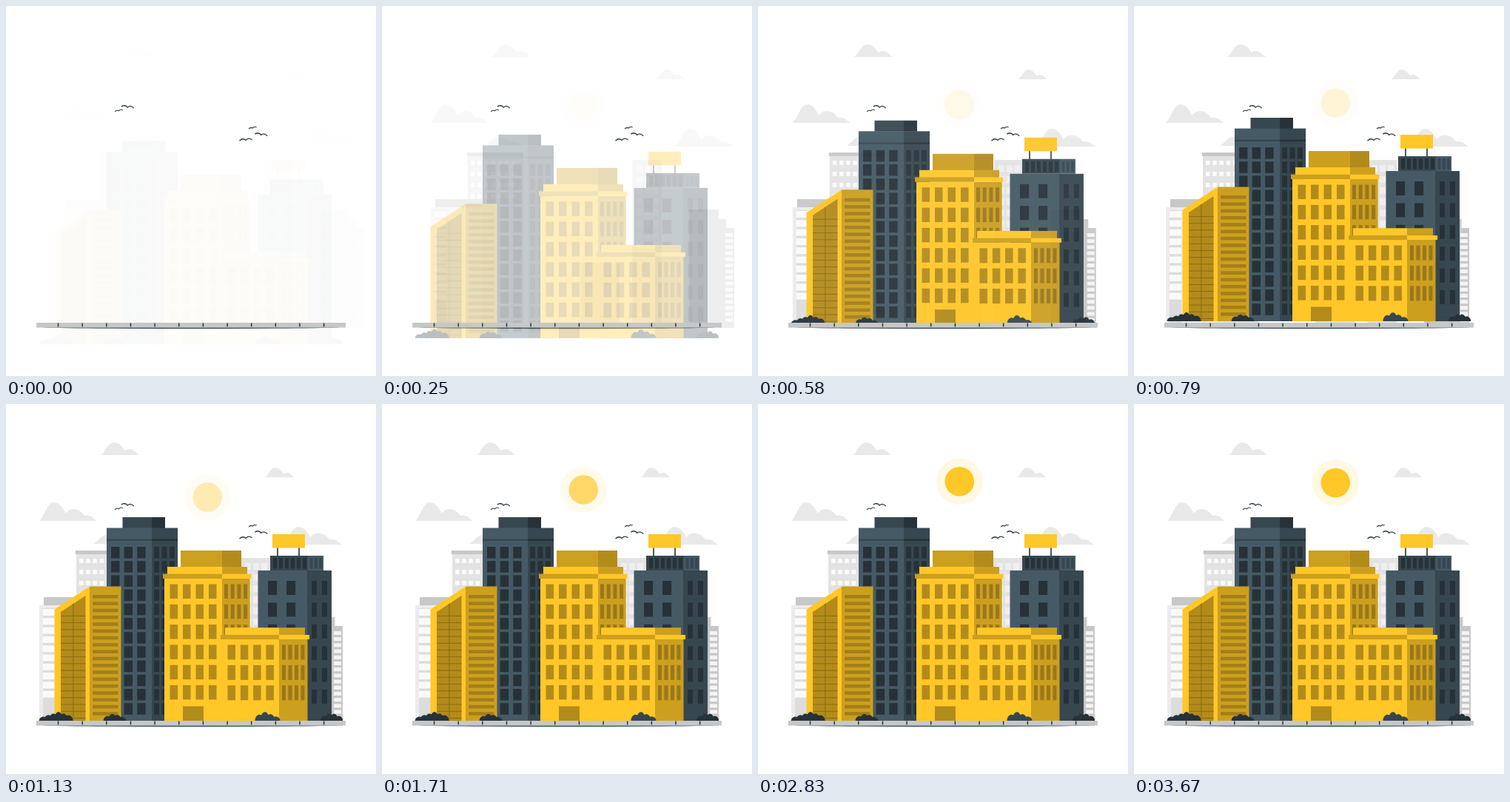
Animation of 500 by 500 pixels, one loop 3710 ms. Source, as an HTML page with a canvas:

```html
<!DOCTYPE html>
<html lang="en">
<head>
<meta charset="utf-8">
<title>City skyline</title>
<style>
html, body { margin: 0; width: 100%; height: 100%; overflow: hidden; background: #fff; }
canvas { display: block; width: 500px; height: 500px; }
</style>
</head>
<body>
<canvas id="stage" width="500" height="500"></canvas>
<script>
const LOOP = 3710, FPS = 24, FRAMES = 89, BASE = 428, SLIDE = 30;
const YELLOW = '#ffc727', GOLD = '#cc9f1f', OCHRE = '#b38b1b', BRONZE = '#99771a';
const SLATE = '#455a64', STEEL = '#37474f', INK = '#263238';
const PALE = '#e3e3e3', ASH = '#c8c8c8', GLASS = '#fafafa';

const stage = document.getElementById('stage').getContext('2d');
const buffer = document.createElement('canvas');
buffer.width = buffer.height = 500;
const c = buffer.getContext('2d');

// Rectangle given by its edges.
function box(color, left, top, right, bottom = BASE, g = c) {
  g.fillStyle = color;
  g.fillRect(left, top, right - left, bottom - top);
}

// Two faces of a block that meet at a corner edge.
function block(front, side, left, corner, right, top, bottom = BASE) {
  box(front, left, top, corner, bottom);
  box(side, corner, top, right, bottom);
}

// Evenly spaced windows of w by h.
function grid(color, x, y, cols, rows, dx, dy, w, h) {
  for (let i = 0; i < cols * rows; i++) {
    const left = x + (i % cols) * dx, top = y + Math.floor(i / cols) * dy;
    box(color, left, top, left + w, top + h);
  }
}

// Wall between two verticals with a sloping top.
function slope(color, left, leftTop, right, rightTop) {
  c.fillStyle = color;
  c.beginPath();
  c.moveTo(left, leftTop);
  c.lineTo(right, rightTop);
  c.lineTo(right, BASE);
  c.lineTo(left, BASE);
  c.fill();
}

// Overlapping humps that shrink from left to right.
function cloud(left, base, width, height, humps) {
  c.fillStyle = '#e9e9e9';
  for (let k = 0; k < humps; k++) {
    const l = left + width * k / humps;
    const w = left + width * (1 - (1 - (k + 1) / humps) ** 1.9) - l;
    const h = height * (1 - 1.07 * k / humps);
    c.beginPath();
    c.moveTo(l, base);
    c.bezierCurveTo(l + w * .18, base - h * .28, l + w * .25, base - h, l + w * .47, base - h);
    c.bezierCurveTo(l + w * .74, base - h, l + w * .82, base - h * .4, l + w, base);
    c.fill();
  }
}

// Round leaves under an arch; peak places the tallest one (0 to 1).
function bush(color, left, width, height, peak) {
  const leaves = Math.round(width / 7);
  c.fillStyle = color;
  for (let k = 0; k < leaves; k++) {
    const u = (k + .5) / leaves;
    const h = height * (1 - 1.1 * Math.abs(u - peak));
    c.beginPath();
    c.ellipse(left + u * width, BASE, width / leaves * .85, h, 0, Math.PI, 2 * Math.PI);
    c.fill();
  }
}

function clouds() {
  cloud(128, 69, 52, 17, 2);
  cloud(350, 99, 39, 13, 2);
  cloud(45, 158, 78, 25, 3);
  cloud(375, 190, 79, 24, 3);
  cloud(118, 189, 52, 12, 2);
}

function farBuildings() {
  box(PALE, 95, 202, 170);
  box(ASH, 94, 198, 170, 203);
  grid(GLASS, 99, 209, 7, 4, 9.2, 15, 5.5, 6);

  box('#ececec', 45, 272, 115);
  box(ASH, 51, 261, 115, 272);
  box('#dcdcdc', 50, 276, 66);
  grid(GLASS, 50, 277, 1, 10, 0, 12.3, 16, 9);

  box(PALE, 317.5, 208, 357);
  grid('#efefef', 323, 215, 3, 8, 11, 15, 8, 9);

  box(PALE, 247, 347, 300);
  box(ASH, 394, 275, 434);
  box(ASH, 430, 288, 444.5);
  box(ASH, 430, 300, 455, 435);
  grid('#f4f4f4', 443, 307, 1, 15, 0, 8.2, 10, 5);
}

function darkTower() {
  block(STEEL, INK, 157.5, 197, 215, 153, 168);
  block(SLATE, STEEL, 136, 197, 232, 167.5);
  block(STEEL, INK, 136, 197, 232, 182.5, 185);
  grid(INK, 142, 193, 3, 12, 17.6, 19.2, 11.5, 15.5);
  grid(INK, 200, 193, 3, 12, 10.5, 19.2, 7, 15.5);
}

function darkOffice() {
  grid(INK, 366.2, 194, 2, 1, 29, 0, 1.6, 12);
  box(YELLOW, 360, 176, 404, 194.5);
  block(STEEL, SLATE, 357, 408, 429, 205, 225);
  grid(INK, 361, 208, 6, 1, 8, 0, 5, 14.5);
  grid(STEEL, 410.5, 208, 3, 1, 6.3, 0, 4, 14.5);
  block(SLATE, STEEL, 340.5, 407, 440, 225);
  grid(INK, 354, 239, 2, 6, 25, 29.4, 12.2, 19);
  grid(INK, 413, 239, 2, 6, 14, 29.4, 7, 19);
}

function yellowTower() {
  block(GOLD, OCHRE, 236, 292, 318, 198, 221);
  block(YELLOW, GOLD, 218, 292, 326, 220, 231);
  block(YELLOW, GOLD, 214, 292, 329.6, 236);
  block(GOLD, YELLOW, 212, 292, 331.5, 229.7, 236);
  grid(OCHRE, 221.5, 243.5, 4, 6, 17.5, 27.3, 10.5, 19.5);
  grid(BRONZE, 295, 243.5, 4, 6, 8.7, 27.3, 5, 19.5);
  box(OCHRE, 239, 408.5, 267);
}

function yellowHall() {
  block(YELLOW, GOLD, 296, 369, 404, 302.2, 313);
  block(YELLOW, GOLD, 292, 369, 407.5, 318);
  block(GOLD, YELLOW, 290, 369, 410, 312, 318);
  grid(OCHRE, 299.5, 325.5, 4, 3, 17.3, 27.4, 10.5, 20);
  grid(BRONZE, 373, 325.5, 4, 3, 8.5, 27.4, 5, 20);
}

function slantedBlock() {
  slope(YELLOW, 65.5, 277.5, 113, 246.5);
  slope(OCHRE, 74, 281, 107.5, 259);
  grid('#87690f', 74, 286, 1, 16, 0, 9.2, 33.5, .9);
  box('#87690f', 90.4, 270, 91.4);
  box(GOLD, 113, 246.5, 155.5);
  grid('#a37f18', 117, 258, 1, 18, 0, 9.3, 34.5, 4.6);
}

function bushes() {
  bush(INK, 47, 41, 12, .58);
  bush(INK, 134, 26, 10, .45);
  bush(STEEL, 339, 29, 12, .4);
  bush(STEEL, 414, 16, 7, .5);
  bush(INK, 427, 26, 11, .5);
}

function city() {
  darkTower();
  darkOffice();
  yellowTower();
  yellowHall();
  slantedBlock();
  bushes();
}

function shadow() {
  stage.fillStyle = SLATE;
  stage.beginPath();
  stage.ellipse(250, 434, 200, 2.2, 0, 0, Math.PI);
  stage.fill();
}

function pavement() {
  box('#c7c7c7', 41, 428, 459, 434.6, stage);
  for (let i = 0; i < 12; i++) {
    stage.fillStyle = INK;
    stage.beginPath();
    stage.ellipse(70.5 + i * 32.65, 431, .8, 3, 0, 0, 2 * Math.PI);
    stage.fill();
  }
}

// Two arched wings around a centre point.
function bird(x, y, span, tilt) {
  const wing = span / 2;
  stage.save();
  stage.translate(x, y);
  stage.rotate(tilt);
  stage.strokeStyle = INK;
  stage.lineWidth = .45 + span * .05;
  stage.beginPath();
  stage.moveTo(-wing, 0);
  stage.quadraticCurveTo(-wing * .45, -wing * .45, 0, 0);
  stage.quadraticCurveTo(wing * .4, -wing * .45, wing, 0);
  stage.stroke();
  stage.restore();
}

function birds() {
  bird(164.3, 136.9, 17, .12);
  bird(344.8, 174.3, 17, .14);
  bird(324, 181.3, 17, -.08);
  bird(152.5, 141.7, 11, -.18);
  bird(333.4, 165.1, 11, -.22);
}

function sun() {
  const disc = (color, r) => {
    c.fillStyle = color;
    c.beginPath();
    c.arc(272.3, 106.5, r, 0, 2 * Math.PI);
    c.fill();
  };
  disc('#fff8e3', 31.3);
  disc(YELLOW, 19.8);
}

// cubic-bezier(.36, -.01, .5, 1.38), solved for x by bisection.
function ease(x) {
  if (x >= 1) return 1;
  const curve = (s, a, b) => 3 * (1 - s) ** 2 * s * a + 3 * (1 - s) * s * s * b + s ** 3;
  let lo = 0, hi = 1;
  for (let i = 0; i < 30; i++) {
    const mid = (lo + hi) / 2;
    if (curve(mid, .36, .5) < x) lo = mid; else hi = mid;
  }
  return curve(lo, -.01, 1.38);
}

// Fades a group in as a whole while it slides into place.
function enter(draw, progress, dx, dy) {
  const offset = SLIDE * (1 - progress);
  c.setTransform(1, 0, 0, 1, 0, 0);
  c.clearRect(0, 0, 500, 500);
  c.translate(dx * offset, dy * offset);
  draw();
  stage.globalAlpha = Math.max(0, Math.min(1, progress));
  stage.drawImage(buffer, 0, 0);
  stage.globalAlpha = 1;
}

function render(ms) {
  const step = Math.min(FRAMES - 1, Math.max(1, Math.floor((ms + 4) * FPS / 1000)));
  const time = (step + 1) / FPS;
  const arrival = ease(time);
  box('#fff', 0, 0, 500, 500, stage);
  enter(sun, ease((step + 1) / FRAMES), 0, 1);
  enter(clouds, arrival, 1, 0);
  enter(farBuildings, arrival, 1, 0);
  shadow();
  enter(city, arrival, 0, 1);
  pavement();
  birds();
}

const start = performance.now();
function tick() {
  render((performance.now() - start) % LOOP);
  requestAnimationFrame(tick);
}
tick();
</script>
</body>
</html>
```
